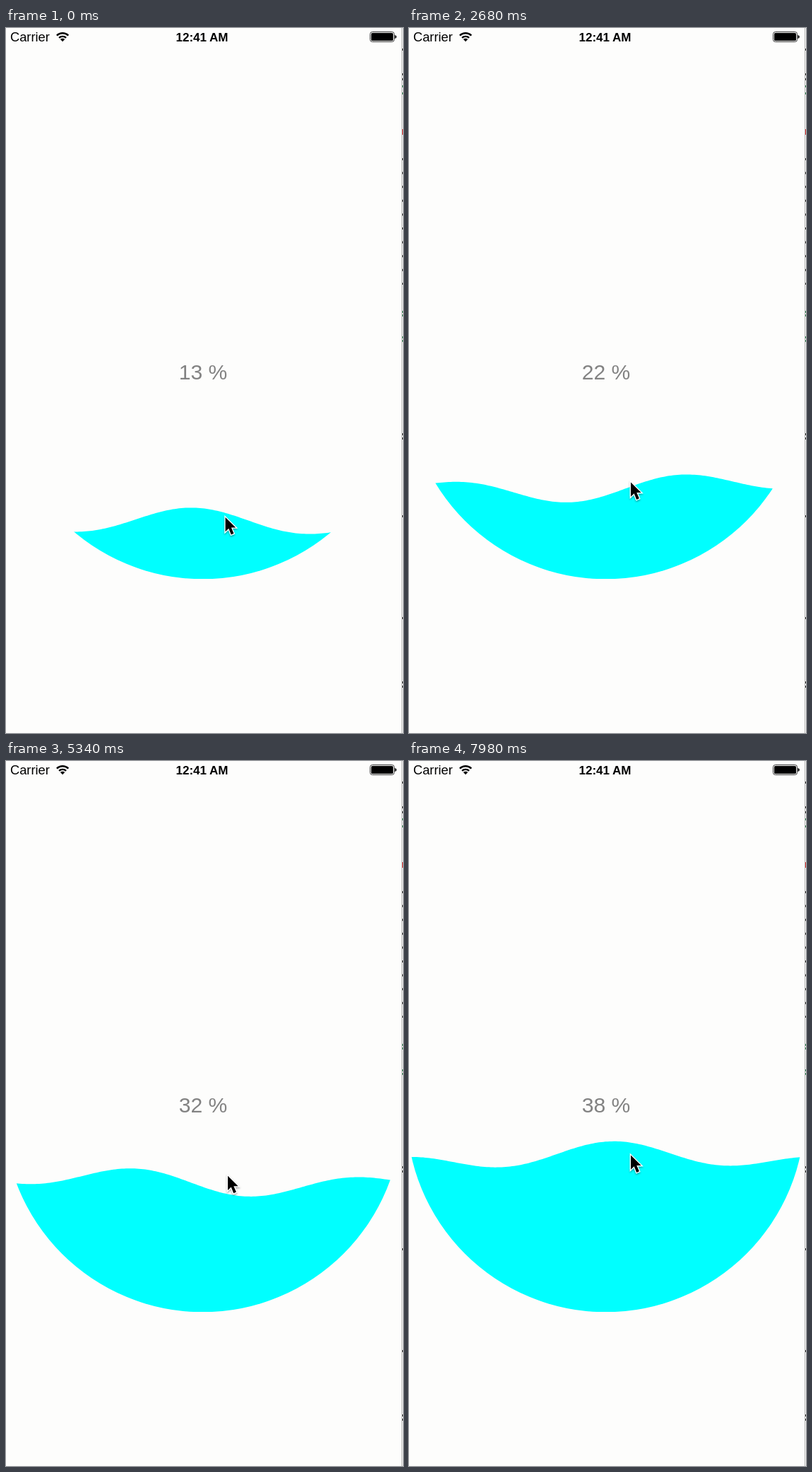
Recreate the animation shown at these times as an HTML page. Size 562 by 997 pixels, loop 8000 ms.

```html
<!DOCTYPE html>
<html lang="en">
<head>
<meta charset="utf-8">
<title>Liquid level</title>
<style>
  html, body { margin: 0; width: 100%; height: 100%; overflow: hidden; background: #fdfdfc; }
  svg { display: block; width: 100%; height: 100%; }
  text { font-family: "Liberation Sans", Arial, sans-serif; }
  .percent { font-size: 30px; fill: #828282; text-anchor: middle; }
</style>
</head>
<body>
<svg viewBox="0 0 562 997">
  <defs>
    <clipPath id="bowl"><circle cx="278.5" cy="497.3" r="282"/></clipPath>
    <filter id="soft" x="-50%" y="-50%" width="200%" height="200%">
      <feDropShadow dx="0" dy="1.5" stdDeviation="1.2" flood-opacity=".4"/>
    </filter>
  </defs>
  <rect width="562" height="997" fill="#fdfdfc"/>

  <text x="6" y="19" font-size="18.3">Carrier</text>
  <g fill="none" stroke="#000" stroke-width="2.4">
    <path d="M71.9 10.6A11.6 11.6 0 0 1 88.3 10.6"/>
    <path d="M75.1 13.9A7.1 7.1 0 0 1 85.1 13.9"/>
  </g>
  <path d="M80.1 19.2L76.9 16A4.5 4.5 0 0 1 83.3 16Z"/>
  <text x="277.5" y="19" font-size="17" font-weight="700" text-anchor="middle">12:41 AM</text>
  <rect x="515.5" y="5.5" width="34" height="14" rx="3" fill="none" stroke="#333"/>
  <rect x="517" y="7" width="31" height="11" rx="1.6"/>
  <path d="M550.5 10Q552.8 10.4 552.8 12.5T550.5 15Z"/>

  <text id="label" class="percent" x="279" y="497"></text>
  <text id="oldLabel" class="percent" x="279" y="497"></text>
  <path id="water" fill="#0ff" clip-path="url(#bowl)"/>

  <!-- sliver of the window behind the right edge -->
  <path d="M560.5 0V997" stroke="#b0b0b0"/>
  <path d="M561.5 0V997" stroke="#fff"/>
  <path d="M561.5 184V363" stroke="#333" stroke-dasharray="3 16.6"/>
  <path d="M561.5 29v3m0 32v3m0 4v3m0 499v3m0 3v3m0 107v3m0 141v3m0 88v3m0 3v3" stroke="#333"/>
  <path d="M561.5 81v3m0 7v3m0 306v10m0 26v8" stroke="#3a8a5a" stroke-dasharray="3 2"/>
  <path d="M561.5 143v8" stroke="#d33"/>

  <path id="pointer" d="M0 0V20.2L4.7 15.8 8.2 24.4 11.9 22.8 8.3 14.4H14.6Z"
        stroke="#fff" stroke-width="2.6" paint-order="stroke" filter="url(#soft)"/>
</svg>
<script>
const LOOP = 8000, CENTER = 278.5, RADIUS = 282, BOTTOM = 779, AMPLITUDE = 22.2;
const PIXELS_PER_PERCENT = 5.64;
const $ = id => document.getElementById(id);

// The drag upwards: [step, water level, pointer height]
const drag = [
  [1, 700.5, 692],
  [27, 677.5, 674],
  [59, 649.6, 642.5],
  [102, 609.9, 600],
  [128, 582.4, 575.5],
  [147, 570.9, 571],
  [161, 560.5, 558],
  [172, 560, 557.5]
];

// Steps come in threes, held for 20, 20 and 100 ms.
function stepAt(ms) {
  const shifted = ms + 20;
  return 3 * Math.floor(shifted / 140) + Math.min(2, Math.floor(shifted % 140 / 20));
}

function dragAt(step) {
  const s = Math.max(1, step);
  const n = Math.max(1, drag.findIndex(point => point[0] >= s));
  const a = drag[n - 1], b = drag[n], mix = (s - a[0]) / (b[0] - a[0]);
  const [, level, pointerY] = a.map((v, i) => v + (b[i] - v) * mix);
  return { level, pointerY };
}

const percentAt = step => Math.floor((779.16 - dragAt(step).level) / PIXELS_PER_PERCENT) + " %";

// A travelling cosine that fades out towards the rim of the bowl.
function wavePath(level, phase) {
  let d = `M-4 ${BOTTOM}`;
  for (let x = -4; x <= 562; x += 3) {
    const u = (x - CENTER) / RADIUS;
    const y = level - AMPLITUDE * (1 - u * u) * Math.cos(1.5 * Math.PI * u - phase);
    d += `L${x} ${y.toFixed(2)}`;
  }
  return d + `L562 ${BOTTOM}Z`;
}

function render(ms) {
  const step = stepAt(ms), { level, pointerY } = dragAt(step);
  const now = percentAt(step), before = percentAt(step - 1);
  const changing = now !== before;
  $("label").textContent = now;
  $("oldLabel").textContent = changing ? before : "";
  $("label").style.opacity = $("oldLabel").style.opacity = changing ? 0.7 : 1;
  $("water").setAttribute("d", wavePath(level, 0.15 * step - 0.45));
  const pointerX = Math.min(314, 310.5 + step / 17);
  $("pointer").setAttribute("transform", `translate(${pointerX} ${pointerY})`);
}

const start = performance.now();
function tick() {
  render((performance.now() - start) % LOOP);
  requestAnimationFrame(tick);
}
tick();
</script>
</body>
</html>
```
